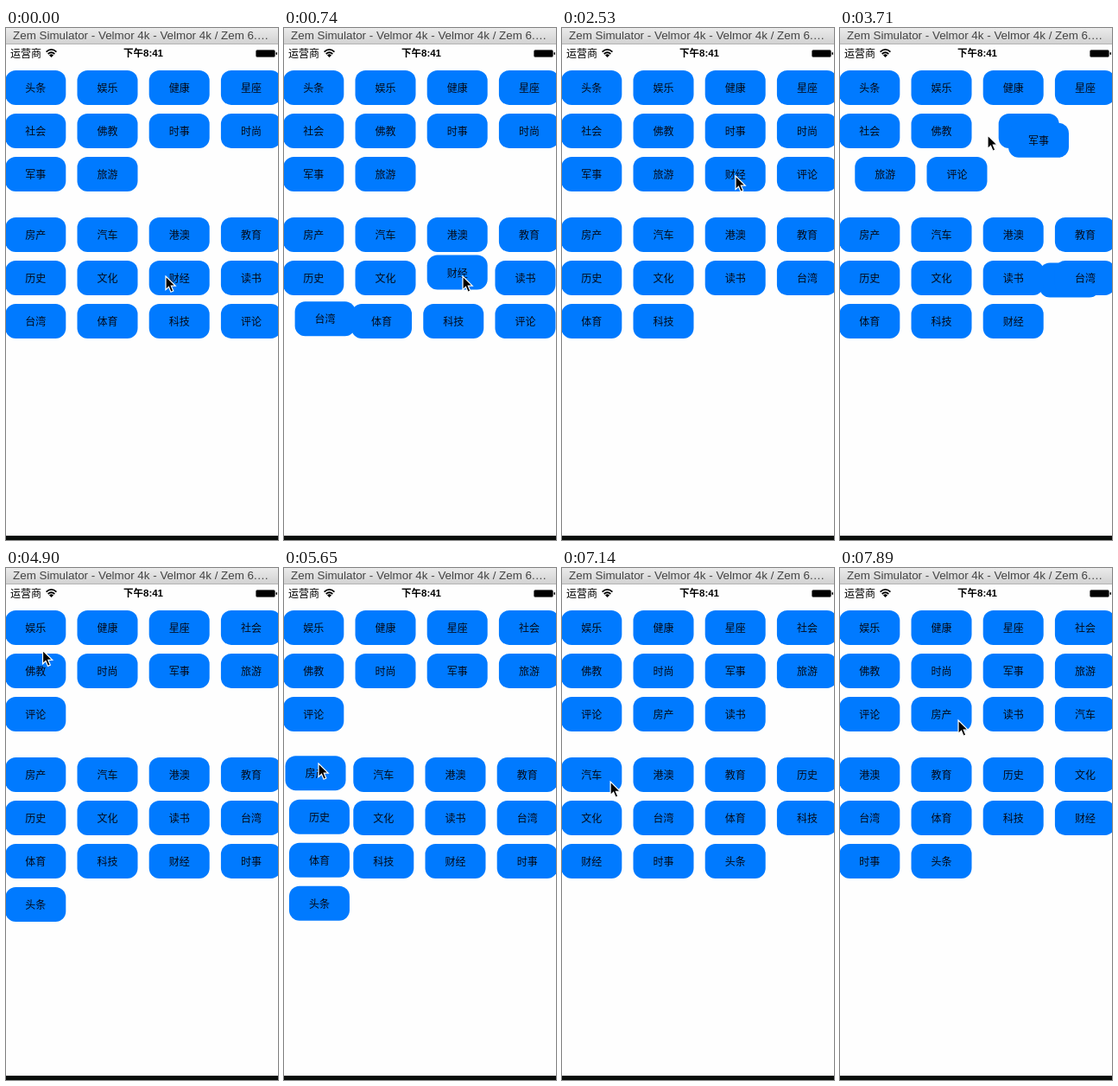
An HTML page that plays this animation: 315x592 px, repeating every 8 s.

```html
<!DOCTYPE html>
<html lang="zh-CN">
<head>
<meta charset="utf-8">
<style>
html, body { margin: 0; width: 100%; height: 100%; overflow: hidden; background: #fefefe; }
body { position: relative; font: 12px/40px "Noto Sans CJK SC", "Noto Sans CJK", sans-serif; color: #000; }
body > * { position: absolute; left: 0; top: 0; white-space: nowrap; }
#title {
  width: 307px; height: 18px; padding-left: 8px; border-bottom: 1px solid #b4b4b4;
  background: linear-gradient(#ebebeb, #d2d2d2); color: #444;
  font: 13.4px/18px "Liberation Sans", sans-serif;
}
.status { top: 19px; line-height: 20px; }
#time {
  width: 318px; text-align: center;
  font: bold 11.5px/20px "Liberation Sans", "Noto Sans CJK SC", sans-serif;
}
#desk { top: 587px; width: 100%; height: 5px; background: #080c09; }
.tag {
  width: 70px; height: 40px; border-radius: 12px; background: #007aff;
  color: #040a18; text-align: center;
}
</style>
</head>
<body>
<div id="title">Zem Simulator - Velmor 4k - Velmor 4k / Zem 6.…</div>
<div class="status" style="left:5px">运营商</div>
<div class="status" id="time">下午8:41</div>
<svg width="315" height="40">
  <path d="M46.6 27.6Q52.5 22.2 58.4 27.6M48.7 30Q52.5 26.6 56.3 30" fill="none" stroke="#000" stroke-width="1.8"/>
  <path d="M52.5 34L50 31.4Q52.5 29.3 55 31.4Z"/>
  <rect x="289.5" y="25.5" width="22" height="8" rx="1.5" stroke="#555" stroke-width=".6"/>
  <rect x="312.5" y="28" width="1.5" height="3" rx=".7"/>
</svg>
<div id="desk"></div>
<script>
const LOOP = 8000, STEP = 148.4, MOVE = 300;
const upper = '头条 娱乐 健康 星座 社会 佛教 时事 时尚 军事 旅游'.split(' ');
const lower = '房产 汽车 港澳 教育 历史 文化 财经 读书 台湾 体育 科技 评论'.split(' ');

// Each click (time, tag, pointer x, y) sends a tag to the end of the other group.
const clicks = [
  [700, '财经', 207, 287], [1594, '评论', 192, 338], [2790, '财经', 201, 171],
  [3500, '时事', 171, 124], [4570, '头条', 43, 70], [5610, '房产', 40, 226],
  [6800, '读书', 145, 297], [7400, '汽车', 40, 238]
];
const path = [[-100, '', 185, 287], ...clicks, [8100, '', 137, 176]];

const ease = p => (p = Math.min(1, Math.max(0, p)), p * p * (3 - 2 * p));
const mix = (a, b, p) => a + (b - a) * p;

const layout = groups => {
  const spots = {};
  groups.forEach((group, g) => group.forEach((name, i) => {
    spots[name] = [-0.7 + i % 4 * 83.2, 49 + g * 170 + (i >> 2) * 50];
  }));
  return spots;
};

let groups = [upper, lower];
const layouts = [layout(groups)];
for (const [, name] of clicks) {
  groups = groups.map(g => g.includes(name) ? g.filter(n => n !== name) : [...g, name]);
  layouts.push(layout(groups));
}

const add = (cls, html) => {
  const el = document.createElement('div');
  el.className = cls;
  el.innerHTML = html;
  return document.body.appendChild(el);
};
const place = (el, x, y) => el.style.transform = `translate(${x}px, ${y}px)`;

const tags = [...upper, ...lower].map(name => [name, add('tag', name)]);
const pointer = add('pointer', `<svg width="16" height="23" style="display:block">
  <path d="M1 1V16.6L4.5 13.3L7 19.2L9.8 18L7.3 12.2H12.2Z" stroke="#fff" stroke-width="1.2"/></svg>`);

function draw(t) {
  const k = clicks.filter(c => c[0] <= t).length;
  const [t0, , x0, y0] = path[k], [t1, , x1, y1] = path[k + 1];

  const p = ease((t - t0) / MOVE);
  for (const [name, el] of tags) {
    const to = layouts[k][name], from = layouts[Math.max(0, k - 1)][name];
    place(el, mix(from[0], to[0], p), mix(from[1], to[1], p));
  }

  // The pointer rests after a click and again before the next one.
  const q = ease(((t - t0) / (t1 - t0) - 0.2) / 0.45);
  place(pointer, mix(x0, x1, q) - 1, mix(y0, y1, q) - 1);
}

// The screen refreshes about seven times a second.
function tick() {
  draw(Math.floor((performance.now() % LOOP + 3) / STEP) * STEP);
  requestAnimationFrame(tick);
}
tick();
</script>
</body>
</html>
```
